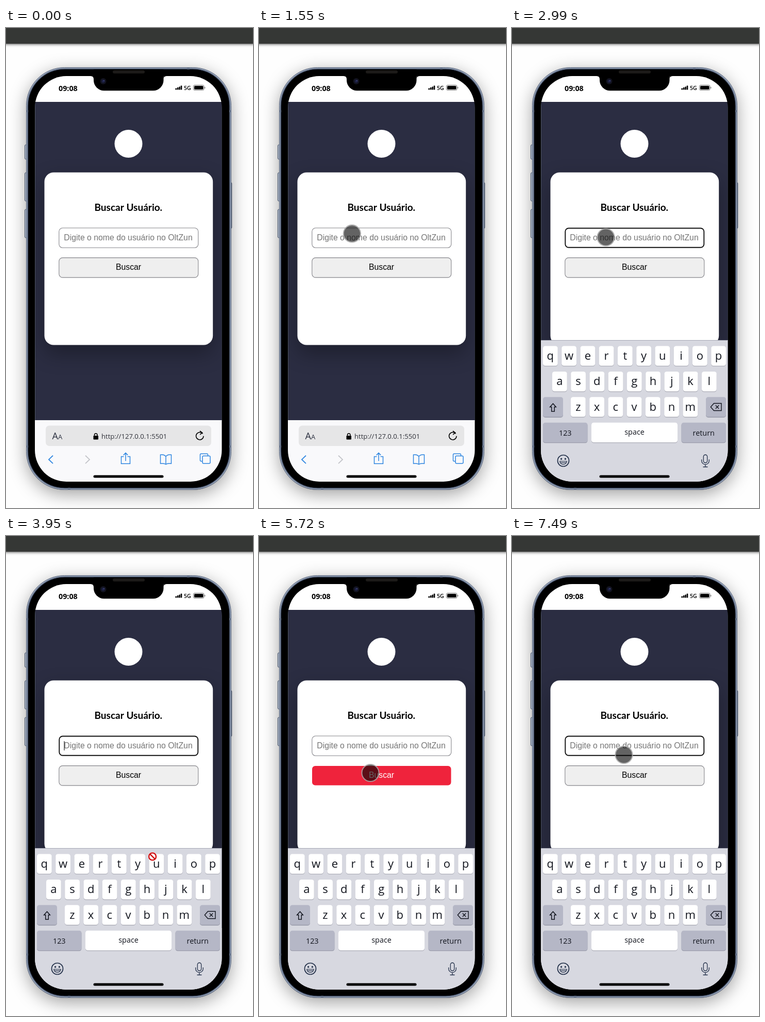
An HTML page with a canvas for the animation above (8000 ms loop, 479x929 px).

```html
<!DOCTYPE html>
<html lang="pt-BR">
<head>
<meta charset="utf-8">
<title>Buscar Usuário</title>
<style>
html, body { margin: 0; width: 100%; height: 100%; overflow: hidden; background: #fefefe; }
canvas { display: block; }
</style>
</head>
<body>
<canvas id="stage" width="479" height="929"></canvas>
<script>
const ctx = document.getElementById('stage').getContext('2d');
const LOOP = 8000;
const SANS = '"Open Sans", "Noto Sans", sans-serif';
const FIELD_FONT = '15.8px "Liberation Sans", Arial, sans-serif';
const NAVY = '#2b2d42', BLUE = '#2f86e0', INK = '#10131c';
const KEYBOARD_TOP = 604;

// Pointer path: time, x, y
const PATH = [
  [70, 413, 948], [200, 392, 780], [330, 335, 520], [460, 275, 318], [570, 190, 280],
  [740, 80, 360], [870, 112, 390], [1090, 217, 388], [1290, 157, 402], [1480, 157, 402],
  [1550, 180, 398], [1620, 206, 394], [1880, 206, 394], [2040, 193, 400], [2260, 193, 400],
  [2390, 183, 405], [2860, 183, 405], [2990, 182, 405], [3590, 182, 405], [3900, 270, 600],
  [3980, 292, 632], [4110, 358, 706], [4300, 318, 640], [4570, 326, 637], [5230, 326, 637],
  [5720, 216, 458.5], [6400, 216, 458.5], [7030, 217, 423.5], [8000, 217, 423.5]
];

function pointerAt(t) {
  if (t < PATH[0][0]) return null;
  const i = PATH.findIndex(p => p[0] > t);
  const a = PATH[i - 1], b = PATH[i];
  const k = (t - a[0]) / (b[0] - a[0]);
  return { x: a[1] + (b[1] - a[1]) * k, y: a[2] + (b[2] - a[2]) * k };
}

function box(x, y, w, h, r, fill, stroke, lw = 1) {
  ctx.beginPath();
  ctx.roundRect(x, y, w, h, r);
  if (fill) { ctx.fillStyle = fill; ctx.fill(); }
  if (stroke) { ctx.strokeStyle = stroke; ctx.lineWidth = lw; ctx.stroke(); }
}

function disc(x, y, r, fill, stroke, lw = 1) {
  box(x - r, y - r, 2 * r, 2 * r, r, fill, stroke, lw);
}

function path(d, stroke, lw = 1.5, fill) {
  const p = new Path2D(d);
  if (fill) { ctx.fillStyle = fill; ctx.fill(p); }
  if (stroke) { ctx.strokeStyle = stroke; ctx.lineWidth = lw; ctx.stroke(p); }
}

function text(str, x, y, font, color, align = 'center') {
  ctx.font = font;
  ctx.fillStyle = color;
  ctx.textAlign = align;
  ctx.fillText(str, x, y);
}

function withShadow(color, blur, dy, draw) {
  ctx.save();
  ctx.shadowColor = color;
  ctx.shadowBlur = blur;
  ctx.shadowOffsetY = dy;
  draw();
  ctx.restore();
}

function drawFrame() {
  ctx.fillStyle = '#fefefe';
  ctx.fillRect(0, 0, 479, 929);
  withShadow('rgba(0,0,0,.38)', 34, 8, () => box(40, 77, 396, 817, 74, '#444'));
  withShadow('rgba(0,0,0,.55)', 5, 1, () => {
    ctx.fillStyle = '#353735';
    ctx.fillRect(-10, -10, 499, 40.5);
  });

  for (const [y, h] of [[226, 28], [280, 55], [351, 55]])
    box(36.5, y, 5, h, 2, '#a9b4c5', '#4a566c');
  box(433, 299, 4.8, 89, 2, '#7d8ba2', '#3f4a5e');

  box(39.5, 76.5, 397, 817, 74, '#9aa7bb', '#56627a');
  box(42, 79, 392, 812, 72, '#1b2232', '#55627a', 1.2);
  box(43.5, 80.5, 389, 809, 70, '#000');
  ctx.fillStyle = '#66738a';
  for (const y of [159, 808]) {
    ctx.fillRect(39, y, 4, 4);
    ctx.fillRect(433, y, 4, 4);
  }
  ctx.fillRect(351, 76, 5, 4);
  ctx.fillRect(120, 890, 5, 4);
}

function drawStatus() {
  ctx.fillStyle = '#fff';
  ctx.fillRect(56, 93, 363, 50);
  text('09:08', 102, 122, '700 14.3px ' + SANS, '#000', 'left');
  [3, 4.5, 6, 8].forEach((h, i) => box(328.5 + i * 3.4, 119.5 - h, 2.6, h, .6, '#000'));
  text('5G', 345, 120, '600 10.6px ' + SANS, '#000', 'left');
  box(363.5, 110.5, 20.5, 10, 2.5, '#fff', '#777');
  box(365, 112, 17.5, 7, 1.5, '#000');
  box(385, 114, 1.3, 3, .6, '#777');
}

function drawPage(focus, caret, hover) {
  ctx.fillStyle = NAVY;
  ctx.fillRect(56, 143, 363, 617);
  ctx.fillStyle = '#66707a';
  ctx.fillRect(56, 143, .6, 617);
  ctx.fillRect(418, 143, .6, 617);
  disc(237.5, 224, 27, '#fff');
  withShadow('rgba(0,0,0,.32)', 40, 16, () => box(74.5, 279.5, 326.7, 334, 18, '#fff'));
  text('Buscar Usuário.', 237.3, 354, '700 19px Lato, sans-serif', '#000');

  if (focus) box(103.3, 387.5, 269, 37.3, 6.5, '#fff', '#101010', 1.9);
  else box(102.8, 387, 270, 38.3, 7, '#fff', '#85858a', 1.1);
  ctx.save();
  ctx.beginPath();
  ctx.rect(112, 388, 252, 36);
  ctx.clip();
  text('Digite o nome do usuário no OltZun', 112.3, 411, FIELD_FONT, '#757575', 'left');
  ctx.restore();
  if (caret) {
    ctx.fillStyle = '#000';
    ctx.fillRect(112.5, 397, 1, 18);
  }

  if (hover) box(103, 445, 269.5, 37.5, 6, '#ef233c');
  else box(102.8, 444.6, 270, 38.3, 7, '#efefef', '#85858a', 1.1);
  text('Buscar', 237.5, 468, FIELD_FONT, hover ? '#fff' : '#000');
}

function drawToolbar() {
  ctx.fillStyle = '#f9f9fb';
  ctx.fillRect(56, 759, 363, 120);
  box(77, 769.5, 321, 39.5, 7, '#e6e6e7');
  text('A', 89.5, 796, '18px ' + SANS, '#2b3040', 'left');
  text('A', 101, 796, '13px ' + SANS, '#2b3040', 'left');
  box(169.5, 789, 9.5, 7.5, 1.2, '#000');
  path('M171.5 789.5v-2.4a2.8 2.8 0 0 1 5.5 0v2.4', '#000', 1.5);
  text('http://127.0.0.1:5501', 185, 795, '13.1px ' + SANS, '#30323a', 'left');
  path('M381.5 785.3a7.2 7.2 0 1 0 1.5 4.4M376 780l4.6 3.2-4.4 3.8', '#000', 1.6);

  path('M91 827.5l-8 7.7 8 7.7', BLUE, 1.8);
  path('M154 827.5l8 7.7-8 7.7', '#c3c4c9', 1.8);
  path('M228.5 829.5h-5v13.8h17v-13.8h-5M232 838v-15M227.8 826.6l4.2-4.2 4.2 4.2', BLUE, 1.5);
  path('M310 829q-4-4-10.5-3v17q7-1 10.5 1.5q3.5-2.5 10.5-1.5v-17q-6.5-1-10.5 3v15', BLUE, 1.5);
  box(376.5, 824, 15, 14.5, 2, null, BLUE, 1.5);
  box(381, 828.3, 15, 14.5, 2, '#f9f9fb', BLUE, 1.5);
}

function key(label, x, y, w, dark, size = 22, base = 26.5) {
  box(x, y + 1.3, w, 38.3, 4.5, dark ? '#9a9cab' : '#adaeb8');
  box(x, y, w, 38.3, 4.5, dark ? '#b5b7c6' : '#fff');
  if (label) text(label, x + w / 2, y + base, size + 'px ' + SANS, INK);
}

function drawKeyboard(dy) {
  ctx.save();
  ctx.translate(0, dy);
  ctx.fillStyle = '#d7d8e0';
  ctx.fillRect(56, KEYBOARD_TOP, 363, 280);
  ctx.fillStyle = '#a6a8b4';
  ctx.fillRect(56, KEYBOARD_TOP, 363, 1);
  const pitch = 36.25;
  [['qwertyuiop', 60], ['asdfghjkl', 78], ['zxcvbnm', 114]].forEach(([row, x0], r) => {
    [...row].forEach((c, i) => key(c, x0 + i * pitch, 615.5 + r * 49.4, 28.7));
  });
  key('', 60, 714.3, 39, true);
  key('', 376, 714.3, 39, true);
  key('123', 60, 763.7, 86.5, true, 14.4, 25.5);
  key('space', 154, 763.7, 167, false, 14.4, 23.5);
  key('return', 328.5, 763.7, 86.5, true, 14.4, 25.5);

  path('M79.5 727l-5.8 6.5h3v8.5h5.6v-8.5h3z', INK, 1.5);
  path('M391.5 726.5h14.5v14h-14.5l-6.2-7zM394.8 730.3l6.4 6.4M401.2 730.3l-6.4 6.4', INK, 1.4);

  const ink = '#25324b';
  disc(99.5, 837.5, 11, null, ink, 1.7);
  disc(95.6, 834, 1.7, ink);
  disc(103.4, 834, 1.7, ink);
  path('M92.8 838.5h13.4a6.7 6.2 0 0 1-13.4 0zM93.5 841.3h12', ink, 1.2);
  box(371.3, 826, 7.4, 15.5, 3.7, null, ink, 1.3);
  path('M367.7 835v2.5a7.3 7.3 0 0 0 14.6 0v-2.5M375 845v4.5M370.5 849.5h9', ink, 1.3);
  ctx.restore();
}

function drawTooltip() {
  withShadow('rgba(0,0,0,.35)', 4, 1, () => box(125.5, 557, 224, 41, 5, '#2c3b55'));
  path('M231.5 597.5h12l-6 5.5z', null, 0, '#2c3b55');
  const font = '12px ' + SANS;
  text('Este é um elemento falso. Use seu', 237.3, 576, font, '#fff');
  text('próprio teclado.', 237.3, 591, font, '#fff');
}

function drawNotch() {
  box(170, 80, 135.5, 41.2, [0, 0, 20, 20], '#000');
  path('M164 93q6 0 6 6v-6zM311.5 93q-6 0-6 6v-6z', null, 0, '#000');
  box(207, 82, 62, 6, 3, '#1c1a18');
  disc(188.5, 103, 6, '#12131f');
  disc(188.5, 103, 3, '#1d2145');
  disc(190, 102, 1, '#4a4f86');
}

function drawPointer(p, blocked) {
  if (blocked) {
    disc(p.x, p.y, 8.7, '#fff');
    disc(p.x, p.y, 7, '#fff', '#d01012', 2.4);
    ctx.beginPath();
    ctx.moveTo(p.x - 5, p.y - 5);
    ctx.lineTo(p.x + 5, p.y + 5);
    ctx.stroke();
    return;
  }
  disc(p.x, p.y, 16, 'rgba(0,0,0,.61)');
  disc(p.x, p.y, 16.6, null, 'rgba(165,165,165,.85)', 2);
}

function render(t) {
  const focusAt = t >= 6890 ? 6890 : t >= 2390 && t < 4430 ? 2390 : null;
  const caret = focusAt !== null && Math.floor((t - focusAt) / 600) % 2 === 0;
  const p = pointerAt(t);
  const open = t >= 2390;
  const hover = !!p && p.x > 103 && p.x < 373 && p.y > 444 && p.y < 483 && t > 5000;

  drawFrame();
  ctx.save();
  ctx.beginPath();
  ctx.roundRect(56, 93, 362.5, 785, 61);
  ctx.clip();
  drawPage(focusAt !== null, caret, hover);
  drawStatus();
  drawToolbar();
  if (open) {
    const kt = t > 2520 && t < 2650 ? 2520 : t;
    const left = Math.max(0, 1 - (kt - 2390) / 290);
    drawKeyboard(275 * Math.pow(left, 4.33));
  }
  if (t >= 4430 && t < 5260) drawTooltip();
  box(169.5, 865.5, 136, 5, 2.5, '#000');
  ctx.restore();
  drawNotch();
  if (p) drawPointer(p, open && p.y > KEYBOARD_TOP);
}

const start = performance.now();
function tick() {
  render((performance.now() - start) % LOOP);
  requestAnimationFrame(tick);
}
tick();
</script>
</body>
</html>
```
